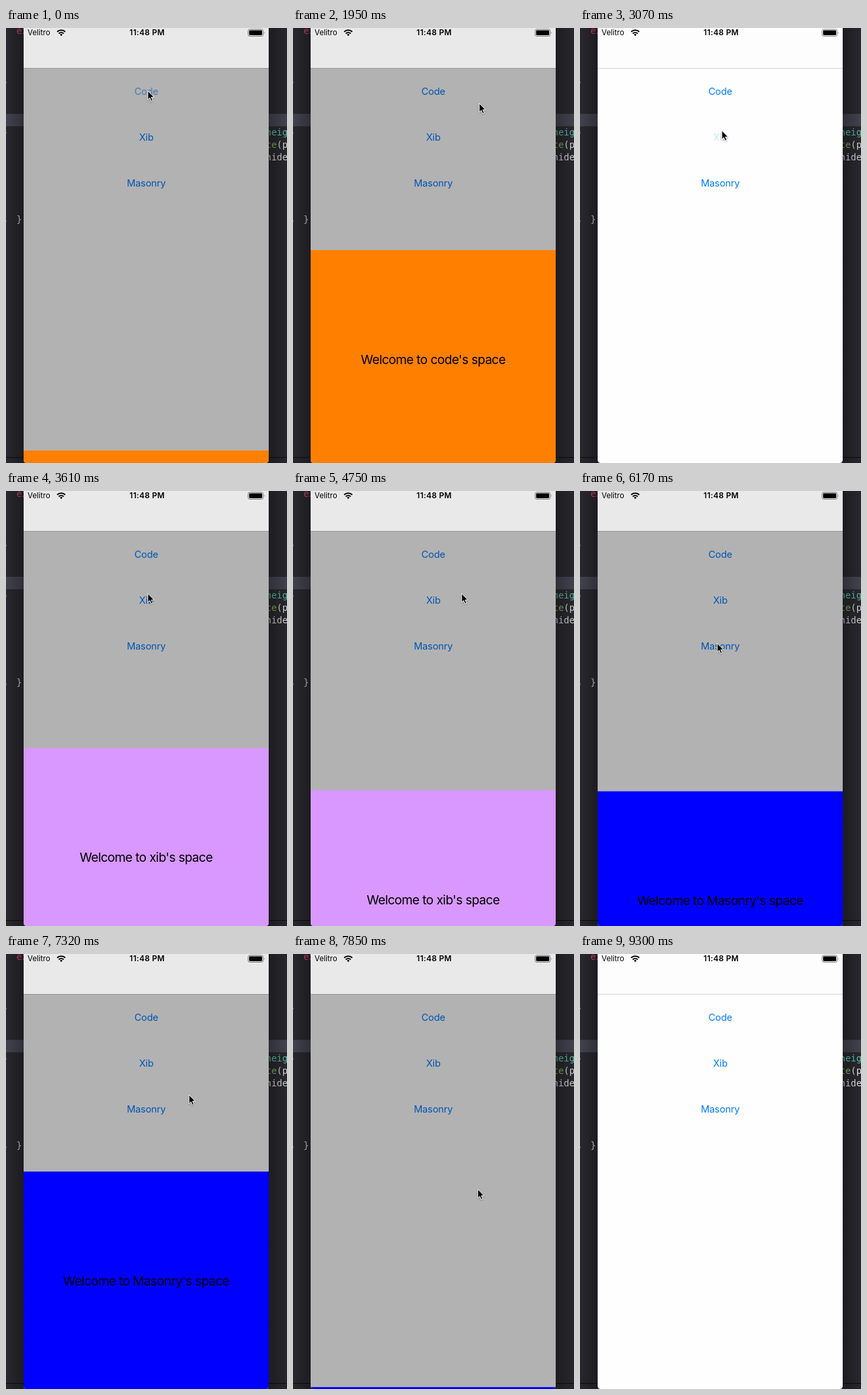
An HTML page that plays this animation: 430 by 664 pixels, repeating every 9.4 s.

```html
<!DOCTYPE html>
<html lang="en">
<head>
<meta charset="utf-8">
<title>Bottom sheets</title>
<style>
html, body { margin: 0; width: 100%; height: 100%; overflow: hidden; background: #26252b; }
svg { display: block; width: 430px; height: 664px; font-family: Inter, "Liberation Sans", sans-serif; }
.code { font: 14px "DejaVu Sans Mono", monospace; }
.status { font-size: 11.6px; }
.btn { font-size: 14.7px; letter-spacing: -.2px; fill: #007aff; text-anchor: middle; }
.title { font-size: 19.3px; letter-spacing: -.6px; text-anchor: middle; }
</style>
</head>
<body>
<svg viewBox="0 0 430 664">
  <defs>
    <linearGradient id="shade">
      <stop offset="0" stop-color="#000" stop-opacity="0"/>
      <stop offset="1" stop-color="#000" stop-opacity=".28"/>
    </linearGradient>
    <clipPath id="screen"><path d="M27 0H402V659q0 5-5 5H32q-5 0-5-5Z"/></clipPath>
    <filter id="soft" x="-50%" y="-50%" width="200%" height="200%">
      <feDropShadow dx="0" dy="1" stdDeviation="1" flood-opacity=".35"/>
    </filter>
  </defs>

  <!-- editor behind the phone -->
  <rect width="430" height="664" fill="#28272d"/>
  <rect y="131" width="430" height="19" fill="#42424e"/>
  <rect y="655" width="430" height="1" fill="#0c0c0e"/>
  <g id="editor" class="code">
    <text x="16" y="9" fill="#e0457b">ex</text>
    <text x="16" y="297" fill="#dcdcde">}</text>
    <text x="397.5" y="164" fill="#5cc6b0">heig</text>
    <text x="397.5" y="183" fill="#e4e4e6"><tspan fill="#86bb5c">te</tspan>(p</text>
    <text x="397.5" y="202" fill="#e4e4e6">hide</text>
    <path d="M0 83h1M0 160h1M0 295h1" stroke="#77767c" stroke-width="2"/>
  </g>
  <rect width="27" height="664" fill="url(#shade)"/>
  <rect width="28" height="664" fill="url(#shade)" transform="translate(430) scale(-1 1)"/>

  <g clip-path="url(#screen)">
    <rect x="27" width="375" height="664" fill="#fefefe"/>
    <text class="btn" x="214.7" y="101.8">Code</text>
    <text class="btn" x="214.7" y="171.8">Xib</text>
    <text class="btn" x="214.7" y="241.8">Masonry</text>
    <rect id="dim" x="27" y="61" width="375" height="603" opacity=".3"/>
    <rect id="nav" x="27" width="375" height="61"/>
    <rect id="line" x="27" y="61" width="375" height="1"/>
    <text class="status" x="33" y="11.4">Velitro</text>
    <text x="216" y="11.4" font-size="12" font-weight="600" letter-spacing=".3" text-anchor="middle">11:48 PM</text>
    <g fill="none" stroke="#000" stroke-width="2">
      <path d="M78.3 5.8a9 9 0 0 1 12.4 0M80.7 8.4a5.6 5.6 0 0 1 7.6 0"/>
      <path d="M84.5 12.2l-2-2.2a3 3 0 0 1 4 0Z" fill="#000" stroke="none"/>
    </g>
    <rect x="370.5" y="2" width="23" height="10.5" rx="2.6" fill="none" stroke="#000" stroke-opacity=".5"/>
    <rect x="372" y="3.5" width="20" height="7.5" rx="1.4"/>
    <path d="M395 5.4q1.6 1.8 0 3.8Z" opacity=".5"/>
    <g id="sheet">
      <rect id="panel" x="27" width="375" height="334"/>
      <text id="title" class="title" x="214.5" y="174"></text>
    </g>
  </g>
  <path id="cursor" d="M0 0V13.6L3.1 10.7L5.2 15.6L7.6 14.6L5.5 9.8H9.7Z" stroke="#fff" stroke-width="1" filter="url(#soft)"/>
</svg>
<script>
const LOOP = 9400, SLIDE = 600, BOTTOM = 664, HEIGHT = 333.5;
const $ = id => document.getElementById(id);
const buttons = document.querySelectorAll('.btn');

const sheets = [
  { name: 'code', color: '#ff8000', press: -200, show: -100, hide: 1883 },
  { name: 'xib', color: '#d898ff', press: 3030, show: 3190, hide: 4494 },
  { name: 'Masonry', color: '#0000ff', press: 5770, show: 5830, hide: 7291 }
];

// pointer stops: time, x, y
const stops = [
  [0, 217, 96], [620, 217, 96], [1140, 285, 115], [2490, 285, 115],
  [2810, 217, 156.5], [3800, 217, 156.5], [4130, 258, 156.5], [5110, 258, 156.5],
  [5280, 209, 232], [5400, 209, 232], [5460, 210, 232.5], [6440, 210, 232.5],
  [6700, 278, 214.5], [6790, 279.5, 214.5], [6960, 280, 215], [7700, 280, 215],
  [7940, 284, 424], [8120, 284, 424], [8380, 366, 645]
];

const clamp = v => Math.min(1, Math.max(0, v));
const mix = (a, b, k) => a + (b - a) * k;

// cubic-bezier(.42, 0, .58, 1)
function ease(x) {
  let lo = 0, hi = 1, u = .5;
  for (let i = 0; i < 20; i++) {
    u = (lo + hi) / 2;
    const v = 1 - u;
    if (1.26 * v * v * u + 1.74 * v * u * u + u * u * u < x) lo = u; else hi = u;
  }
  return u * u * (3 - 2 * u);
}

const slide = (t, start) => ease(clamp((t - start) / SLIDE));

function drawPointer(t) {
  const i = stops.findIndex(s => s[0] > t);
  $('cursor').style.display = i < 0 ? 'none' : '';
  if (i < 0) return;
  const [a, b] = [stops[i - 1], stops[i]];
  const k = clamp((t - a[0]) / (b[0] - a[0]));
  const e = k * k * (3 - 2 * k);
  $('cursor').setAttribute('transform', `translate(${mix(a[1], b[1], e)} ${mix(a[2], b[2], e)})`);
}

function draw(t) {
  const open = sheets.find(s => t >= s.show && t < s.hide + SLIDE);
  $('dim').style.display = $('sheet').style.display = open ? '' : 'none';
  $('nav').setAttribute('fill', open ? '#e9e9e9' : '#fdfdfd');
  $('line').setAttribute('fill', open ? '#989898' : '#d2d2d4');
  if (open) {
    const y = BOTTOM - HEIGHT * (slide(t, open.show) - slide(t, open.hide));
    $('sheet').setAttribute('transform', `translate(0 ${y})`);
    $('panel').setAttribute('fill', open.color);
    $('title').textContent = `Welcome to ${open.name}'s space`;
  }
  sheets.forEach((s, i) => {
    buttons[i].style.opacity = t < s.press ? 1 : mix(.2, 1, clamp((t - s.show) / 200));
  });
  $('editor').style.opacity = t < 9300 ? .9 : 1;
  drawPointer(t);
}

const begin = performance.now();
function tick() {
  draw((performance.now() - begin) % LOOP);
  requestAnimationFrame(tick);
}
tick();
</script>
</body>
</html>
```
